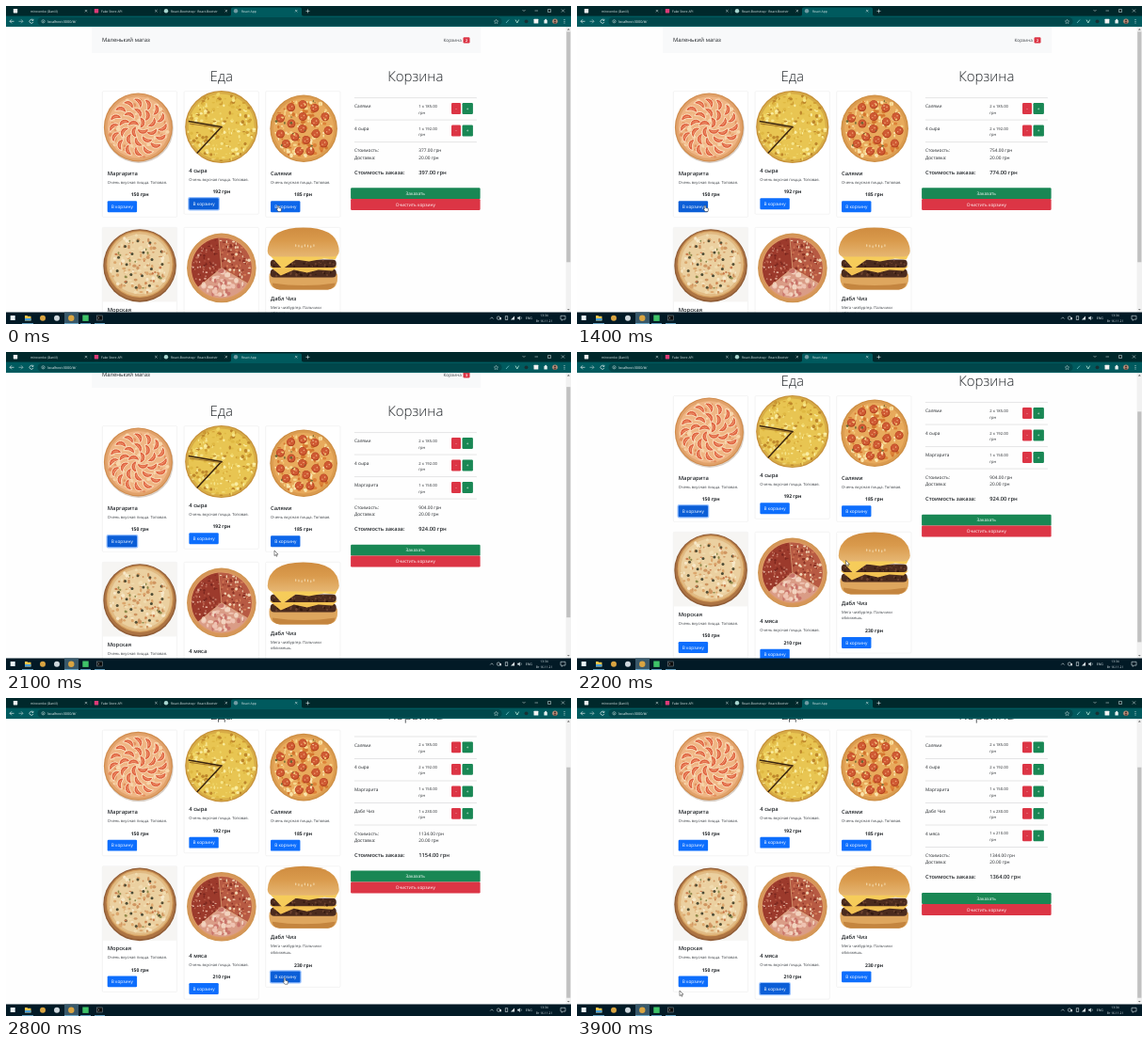
These frames come from a looping animation (600x338 px, 4 s). An HTML page:

```html
<!DOCTYPE html>
<html>
<head>
<meta charset="utf-8">
<title>Shop cart</title>
<style>
  html, body { margin: 0; width: 100%; height: 100%; overflow: hidden; background: #fff; }
  svg { display: block; width: 600px; height: 338px; }
  text { font-family: "Open Sans", "Noto Sans", sans-serif; text-rendering: geometricPrecision; white-space: pre; }
</style>
</head>
<body>
<svg id="stage" viewBox="0 0 600 338" xmlns="http://www.w3.org/2000/svg"></svg>
<script>
const LOOP = 4000, STEP = 100;
const BLUE = '#0d6efd', BLUE_MID = '#0c66ea', BLUE_DARK = '#0b5ed7', RED = '#dc3545', GREEN = '#198754', INK = '#212529';

// ---- drawing helpers -------------------------------------------------
let seed = 7;
const rnd = (a = 0, b = 1) => {
  seed = (seed * 16807) % 2147483647;
  return a + (b - a) * seed / 2147483647;
};
const many = (n, fn) => Array.from({ length: n }, (_, i) => fn(i)).join('');
const rect = (x, y, w, h, fill, more = '') => `<rect x="${x}" y="${y}" width="${w}" height="${h}" fill="${fill}" ${more}/>`;
const disc = (x, y, r, fill, more = '') => `<circle cx="${x}" cy="${y}" r="${r}" fill="${fill}" ${more}/>`;
const path = (d, fill, more = '') => `<path d="${d}" fill="${fill}" ${more}/>`;
const line = (d, color, w = .6) => path(d, 'none', `stroke="${color}" stroke-width="${w}"`);
const text = (x, y, s, size, { fill = INK, weight = 400, anchor = 'start' } = {}) =>
  `<text x="${x}" y="${y}" font-size="${size}" fill="${fill}" font-weight="${weight}" text-anchor="${anchor}">${s}</text>`;
const button = (x, y, w, h, fill, label, size = 4.75) =>
  rect(x, y, w, h, fill, 'rx="1.2"') + text(x + w / 2, y + h / 2 + 1.6, label, size, { fill: '#fff', anchor: 'middle' });
const polar = (r, a) => [r * Math.cos(a), r * Math.sin(a)];
const ring = (n, r, fn, turn = 0) => many(n, i => {
  const a = turn + i * 2 * Math.PI / n;
  return fn(...polar(r, a), a * 180 / Math.PI);
});
// Spots scattered evenly over a disc, optionally limited to a sector
const scatter = (n, r, colors, lo, hi, from = 0, to = 2 * Math.PI) => many(n, i => {
  const [x, y] = polar(r * Math.sqrt(rnd()), rnd(from, to));
  return `<ellipse cx="${x.toFixed(1)}" cy="${y.toFixed(1)}" rx="${rnd(lo, hi).toFixed(1)}" ry="${rnd(lo, hi).toFixed(1)}" fill="${colors[i % colors.length]}"/>`;
});
const sector = (r, a, b, fill) => path(`M0 0L${polar(r, a)}A${r} ${r} 0 0 1 ${polar(r, b)}Z`, fill);
const at = (x, y, body, more = '') => `<g transform="translate(${x} ${y}) ${more}">${body}</g>`;

// ---- food, each centred on its own origin ----------------------------
const crust = (r, edge, inside) =>
  disc(0, 0, r, edge) + disc(0, 0, r - 1.2, inside, 'opacity=".55"') + disc(0, 0, r - 3.6, inside);

function margherita() {
  const slice = (x, y, a) => at(x, y,
    path('M-2-6A6 6 0 0 1-2 6Q1 0-2-6Z', '#df6240', 'stroke="#fae0bd" stroke-width=".9"') +
    path('M.6-3Q2.500 0 .6 3', 'none', 'stroke="#f09a72" stroke-width=".9"'), `rotate(${a + 55})`);
  return disc(.6, 1.2, 36.8, '#d9cfc6') + crust(36.5, '#d18c4d', '#efb584') +
    scatter(70, 32, ['#f7d7ac', '#e38f5e', '#f2c292'], .8, 2.6) +
    ring(16, 26, slice) + ring(10, 15.5, slice, .3) + ring(4, 6, slice, .6);
}

function fourCheese() {
  return crust(38.6, '#c58f38', '#e8c552') +
    scatter(230, 36, ['#f6e488', '#cf9c33', '#f0d668', '#bd862b', '#faeda2', '#dfb843'], .5, 2.1) +
    line('M-35-6L0 0L-26 28', '#3a2410', 1.5) + line('M-34-3.500L-1 1', '#8a5a1e', .8);
}

function salami() {
  const round = (x, y) => {
    const cx = x + rnd(-1.5, 1.5), cy = y + rnd(-1.5, 1.5);
    return disc(cx, cy, 4.5, '#b3401f') + disc(cx - .2, cy - .3, 3.8, '#cf5a33') +
      disc(cx + 1.2, cy - 1, .8, '#efa878') + disc(cx - 1.4, cy + 1.1, .7, '#efa878');
  };
  return crust(35.8, '#cd8d42', '#e8aa5c') +
    scatter(120, 32, ['#f6d68c', '#de8238', '#fae5ac', '#d4752e'], .7, 2.4) +
    ring(11, 25.5, round, .1) + ring(6, 13.5, round, .4) + round(0, 0) +
    scatter(34, 31, ['#fbe9b8', '#f3c774', '#6c6a35'], .5, 1.4);
}

function seafood() {
  return rect(-39.5, -40, 78.6, 79, '#f6f5f3') + disc(0, .6, 38.8, '#8f5c36') + disc(0, .2, 37.6, '#ad7443') +
    at(0, -1, crust(35.5, '#d6a160', '#ebd0a0') +
      scatter(130, 32, ['#f7e8c8', '#dba66c', '#f1dcb0', '#cf9560'], .7, 2.2) +
      ring(11, 25, (x, y) => disc(x + rnd(-2, 2), y, 1.5, '#544f35')) +
      ring(7, 14, (x, y) => disc(x, y + rnd(-2, 2), 1.5, '#4c4a34'), .5) +
      scatter(24, 29, ['#8d8a4a', '#c8794a'], .7, 1.5));
}

function fourMeat() {
  const q = Math.PI;
  return crust(36.8, '#cf9450', '#dc9a63') +
    sector(32, q * .78, q * 1.47, '#9c3a2c') +
    sector(32, q * 1.47, q * 2.17, '#b75a43') +
    sector(32, q * .17, q * .78, '#da9c86') +
    scatter(75, 31, ['#c26a55', '#7a271f', '#e2ac98'], .4, 1.4, q * .8, q * 1.46) +
    scatter(80, 31, ['#f0d5b4', '#8c3226', '#d47d58'], .5, 1.8, q * 1.49, q * 2.15) +
    scatter(50, 30, ['#efc3b2', '#c9746a', '#f2d3bf'], .9, 3, q * .2, q * .76) +
    line(`M${polar(32, q * .78)}L0 0L${polar(32, q * .17)}M0 0L${polar(32, q * 1.47)}`, '#dfb285', .5);
}

function burger() {
  const patty = (y, h) => rect(-35, y, 70, h, '#4b2b1e', 'rx="4"') +
    many(34, () => disc(rnd(-32, 32), rnd(y + 1, y + h - 1), rnd(.5, 1.3), rnd() < .5 ? '#6d4330' : '#33190f'));
  return path('M-36 16H36Q38 32 26 33H-25Q-38 32-36 16Z', '#dea65e') +
    path('M-33 26Q0 31 34 26Q33 32 26 33H-25Q-33 32-33 26Z', '#c4853f') +
    patty(11, 9) + path('M-36 8L36 8 31 13 16 12 4 15-10 12-24 18Z', '#f2c152') +
    patty(1, 8.500) + path('M-37-5H37L34 1 22 0 6 3-8 1-22 11Z', '#f6cc5a') +
    path('M-38-8Q-37-33 0-33Q37-33 38-8Q38-2 30-2H-31Q-38-2-38-8Z', 'url(#bun)') +
    many(7, i => `<ellipse cx="${-8 + i * 3.2}" cy="${-14 + (i % 3) * .7}" rx=".6" ry="1.5" fill="#f8e2ba" opacity=".8"/>`);
}

// ---- catalogue -------------------------------------------------------
const TASTY = ['Очень вкусная пицца. Топовая.'];
const [MARGH, CHEESE, SALAMI, SEA, MEAT, BURGER] = [0, 1, 2, 3, 4, 5];
const items = [
  { name: 'Маргарита', price: 150, img: 79, art: margherita, cx: 38, cy: 38.2 },
  { name: '4 сыра', price: 192, img: 76, art: fourCheese, cx: 39.7, cy: 37.8 },
  { name: 'Салями', price: 185, img: 79, art: salami, cx: 40.4, cy: 39.5 },
  { name: 'Морская', price: 150, img: 79, art: seafood, cx: 39.7, cy: 40 },
  { name: '4 мяса', price: 210, img: 86.7, art: fourMeat, cx: 39.8, cy: 43 },
  { name: 'Дабл Чиз', price: 230, img: 67, art: burger, cx: 40, cy: 33, note: ['Мега чизбургер. Пальчики', 'оближешь.'] }
];
items.forEach((it, i) => {
  it.note = it.note || TASTY;
  it.x = 102.4 + (i % 3) * 86.67;
  it.y = i < 3 ? 90.7 : 235.4;
  it.low = it.img + (it.note.length - 1) * 7;
  it.bx = it.x + 5.3;
  it.by = it.y + it.low + 37.6;
});
const BW = 31.4, BH = 11.9;

function card(it) {
  const mid = { anchor: 'middle' };
  return at(it.x, it.y,
    rect(0, 0, 79.2, it.low + 54.6, '#fff', 'stroke="#e2e2e2" stroke-width=".4" rx="1"') +
    at(it.cx, it.cy, it.art()) +
    text(5.3, it.img + 10.4, it.name, 5.8, { weight: 600 }) +
    it.note.map((s, i) => text(5.3, it.img + 19.3 + i * 6.6, s, 4.13, { fill: '#3a3f44' })).join('') +
    text(39.8, it.low + 32.8, it.price + ' грн', 5.05, { weight: 700, ...mid }));
}

// ---- browser and desktop chrome --------------------------------------
function browser() {
  const pale = '#e4eeee', dim = '#9fbfc0', bar = '#005a5e';
  const tabs = [
    [10, 26, '#f1f1f1', 'mirovenko (Daniil)'], [96, 101, '#dd3b77', 'Fake Store API'],
    [170, 175, '#a9d6d0', 'React-Bootstrap · React-Bootstr'], [244, 250, '#6f9ca3', 'React App']
  ];
  const cross = (x, y, s = 1.2) => line(`M${x - s} ${y - s}l${2 * s} ${2 * s}m0 ${-2 * s}l${-2 * s} ${2 * s}`, pale, .5);
  return rect(0, 0, 600, 11, '#00282b') +
    path('M237 11Q239 10.500 239 9V3Q239 1.500 241 1.500H312Q314 1.500 314 3V9Q314 10.500 316 11Z', bar) +
    rect(0, 10.6, 600, 11.5, bar) + rect(33.5, 12, 493, 8.8, '#00474b', 'rx="4.4"') +
    tabs.map(([ix, tx, c, s], i) =>
      (i < 2 ? rect(ix - 2.2, 3, 4.4, 4.4, c, 'rx=".6"') : disc(ix, 5.2, 2.2, c)) +
      text(tx, 6.5, s, 3.42, { fill: pale }) + cross(85 + i * 74.4, 5.2)).join('') +
    line('M90 3v5M164 3v5', '#3b5b5e', .4) +
    line('M320.500 3.400v4M318.500 5.400h4', pale) +
    line('M548.500 4l1.500 1.500 1.500-1.500M561.500 5h3.500M575.500 3.500h3v3h-3Z', pale, .5) + cross(591.5, 5, 1.6) +
    line('M8.500 16.300H4m2-2l-2 2 2 2', pale, .7) + line('M13.500 16.300H18m-2-2l2 2-2 2', dim, .7) +
    line('M28.700 15.200a2 2 0 1 0 .2 1.700M28.900 13.800v1.600h-1.600', pale, .7) +
    disc(39.5, 16.3, 1.6, 'none', `stroke="${pale}" stroke-width=".5"`) + line('M39.500 16v1.200', pale, .5) +
    text(44, 17.7, 'localhost:3000/#/', 3.75, { fill: '#f1f6f6' }) +
    line('M520.500 14.200l.7 1.500 1.500.2-1.100 1.100.3 1.600-1.400-.8-1.400.8.3-1.600-1.100-1.100 1.500-.2Z', pale, .4) +
    line('M531 18l3-3.400', '#67b9c0', .9) + line('M541 14.600l1.800 3.400 1.800-3.400', '#a9dcd0', .9) +
    disc(552.5, 16.3, 1.9, '#173034') + rect(560.5, 13.8, 4.8, 4.8, '#f2f2f2', 'rx=".5"') +
    rect(571.4, 15, 3.4, 3.4, pale, 'rx=".5"') + disc(573.2, 14.8, 1, pale) +
    disc(583, 16.3, 2.8, '#b58c78') + disc(583, 15.6, 1, '#3c2b29') + path('M581 18.400q2-3 4 0Z', '#3c2b29') +
    [14.6, 16.3, 18].map(y => disc(593, y, .5, pale)).join('');
}

function taskbar() {
  const pale = '#dce6ea';
  const tray = { fill: pale, anchor: 'middle' };
  return rect(0, 325.5, 600, 12.5, '#021a26') + rect(62, 325.5, 15, 12.5, '#38586a') +
    rect(4.7, 329, 5, 5, '#eaf3f7') +
    path('M20 329h2.400l.8.800h3.300v4.800H20Z', '#f3c64b') + rect(20, 332, 6.5, 2.4, '#4a9fd8') +
    disc(39, 331.7, 3, '#d9a441') + disc(54, 331.7, 3, '#cfd8dd') + disc(69.3, 331.7, 3.2, '#d9a441') +
    rect(81.3, 328.5, 6.4, 6.4, '#3fc368') + rect(96.5, 329, 6, 5, '#0c0c0c', 'stroke="#8b979d" stroke-width=".5"') +
    line('M97.700 330.500l1.200 1-1.200 1', pale, .5) +
    [[17, 12], [62, 15], [79, 11], [94, 11]].map(([x, w]) => rect(x, 337.2, w, .8, '#76b9dd')).join('') +
    line('M514.200 332.500l1.700-1.700 1.700 1.700', pale) + disc(523, 331.6, 1.7, 'none', `stroke="${pale}" stroke-width=".6"`) +
    rect(524.3, 331, 1.6, 2.4, pale) + rect(530.2, 329.8, 2.6, 3.6, 'none', `stroke="${pale}" stroke-width=".6"`) +
    path('M536 333.500h4v-4Z', pale) + path('M543.200 330.800h1.200l1.400-1.300v4.400l-1.400-1.300h-1.200Z', pale) +
    line('M546.800 330.300q1.200 1.300 0 2.600', pale, .5) +
    text(555.3, 333, 'ENG', 3.55, tray) + text(571.5, 330.2, '13:34', 3.3, tray) +
    text(571.5, 335.8, 'Вт 16.11.21', 3.3, tray) +
    path('M589 329.300h5v3.800h-2.500l-1.200 1.300v-1.300H589Z', 'none', `stroke="${pale}" stroke-width=".6"`);
}

const heading = (x, s) => text(x, 80, s, 15, { weight: 300, anchor: 'middle' });
const stage = document.getElementById('stage');
stage.innerHTML =
  `<defs><linearGradient id="bun" x1="0" y1="0" x2="0" y2="1"><stop offset="0" stop-color="#cf8c40"/>
   <stop offset=".45" stop-color="#d99a4c"/><stop offset="1" stop-color="#e6b672"/></linearGradient></defs>` +
  rect(0, 0, 600, 338, '#fefefe') +
  '<g id="page">' + rect(91.2, 21, 413, 29, '#f8f9fa') +
  text(102, 38.4, 'Маленький магаз', 5.92) + text(464.5, 38, 'Корзина', 4.7, { fill: '#3d4246' }) +
  heading(228.8, 'Еда') + heading(434.8, 'Корзина') +
  items.map(card).join('') + '<g id="buttons"></g><g id="cart"></g></g>' +
  rect(594.6, 22, 5.4, 304, '#f1f1f1') + path('M595.900 25.500h2.800l-1.400-1.500Z', '#555') +
  path('M595.900 322h2.800l-1.400 1.500Z', '#777') + rect(595.2, 27.3, 4.2, 245, '#c1c1c1', 'id="thumb"') +
  browser() + taskbar() + '<g id="pointer"></g>';
const [page, buttons, cart, thumb, pointer] =
  ['page', 'buttons', 'cart', 'thumb', 'pointer'].map(id => document.getElementById(id));

// ---- timeline --------------------------------------------------------
const clicks = [[CHEESE, -500], [SALAMI, 300], [CHEESE, 1100], [MARGH, 1500], [BURGER, 2800], [MEAT, 3500]];
const track = [
  [0, 289, 212], [400, 289, 212], [800, 211, 211], [1100, 211, 211], [1400, 136, 212], [1600, 136, 212],
  [1950, 285, 211], [2100, 285, 211], [2300, 286, 232], [2600, 296, 297], [2900, 296, 298],
  [3300, 227, 314], [3400, 212, 310], [3600, 212, 310], [3900, 109, 311], [4000, 109, 311]
];
const scrolls = [[0, 0], [2000, 0], [2100, 12], [2200, 44], [2300, 56.6], [4000, 56.6]];

function sample(keys, t) {
  const i = keys.findIndex(k => k[0] > t), a = keys[i - 1], b = keys[i];
  const u = (t - a[0]) / (b[0] - a[0]), e = u * u * (3 - 2 * u);
  return a.slice(1).map((v, j) => v + (b[j + 1] - v) * e);
}

function hovered(t) {
  t = (t + LOOP) % LOOP;
  const [x, y] = sample(track, t), [s] = sample(scrolls, t);
  return items.findIndex(it => x >= it.bx && x <= it.bx + BW && y + s >= it.by && y + s <= it.by + BH);
}

function drawButtons(t) {
  const [focus, since] = clicks.filter(c => c[1] - STEP <= t).pop();
  const now = hovered(t), before = hovered(t - STEP);
  return items.map((it, i) => {
    const heat = i === focus ? 2 : (i === now) + (i === before);
    const halo = i === focus && since <= t
      ? rect(it.bx - 1.2, it.by - 1.2, BW + 2.4, BH + 2.4, '#98c1fe', 'rx="2"') : '';
    return halo + button(it.bx, it.by, BW, BH, [BLUE, BLUE_MID, BLUE_DARK][heat], 'В корзину');
  }).join('');
}

function drawCart(t) {
  const count = new Map([[SALAMI, 1], [CHEESE, 1]]);
  clicks.filter(c => c[1] > 0 && c[1] <= t).forEach(([i]) => count.set(i, (count.get(i) || 0) + 1));
  const pitch = 23.5, money = n => n.toFixed(2) + ' грн', rule = y => line(`M369.900 ${y}H499.900`, '#d3d4d5', .6);
  let y = 97.6, sum = 0, out = rule(y);
  for (const [i, n] of count) {
    const { name, price } = items[i];
    sum += n * price;
    out += text(370, y + 10.8, name, 4.75) +
      text(438.3, y + 10.4, `${n} x ${price}.00`, 4.13) + text(438.3, y + 17, 'грн', 4.13) +
      button(473, y + 5.4, 10, 11.9, RED, '-') + button(484.5, y + 5.4, 11.4, 11.9, GREEN, '+') +
      rule(y + pitch);
    y += pitch;
  }
  const row = (dy, label, value, size, weight) =>
    text(370, y + dy, label, size, { weight }) + text(438.3, y + dy, money(value), size, { weight });
  return out + row(10.8, 'Стоимость:', sum, 4.75) + row(18, 'Доставка:', 20, 4.75) +
    row(34, 'Стоимость заказа:', sum + 20, 5.75, 600) +
    button(366.1, y + 48.6, 137.5, 11.9, GREEN, 'Заказать') + button(366.1, y + 60.5, 137.5, 11.9, RED, 'Очистить корзину') +
    rect(485.5, 33.2, 7, 6.3, RED, 'rx="1.2"') +
    text(489, 37.8, count.size, 3.7, { fill: '#fff', weight: 700, anchor: 'middle' });
}

const ARROW = 'M0 0V5.600L1.300 4.400 2.200 6.300 3 5.900 2.200 4.100H4Z';
const HAND = 'M0 0q.8 0 .8.8V2.600l2.200.5q.6.2.5 1L3 6.500H.2L-1.800 4q.4-.6 1 0V.8Q-.8 0 0 0Z';

function draw(t) {
  const [s] = sample(scrolls, t), [x, y] = sample(track, t);
  page.setAttribute('transform', `translate(0 ${-s})`);
  thumb.setAttribute('y', 27.3 + s * .82);
  buttons.innerHTML = drawButtons(t);
  cart.innerHTML = drawCart(t);
  pointer.innerHTML = at(x, y, path(hovered(t) < 0 ? ARROW : HAND, '#fff', 'stroke="#222" stroke-width=".5"'));
}

let last = -1;
function tick() {
  const t = Math.floor(performance.now() % LOOP / STEP) * STEP;
  if (t !== last) draw(last = t);
  requestAnimationFrame(tick);
}
tick();
</script>
</body>
</html>
```
